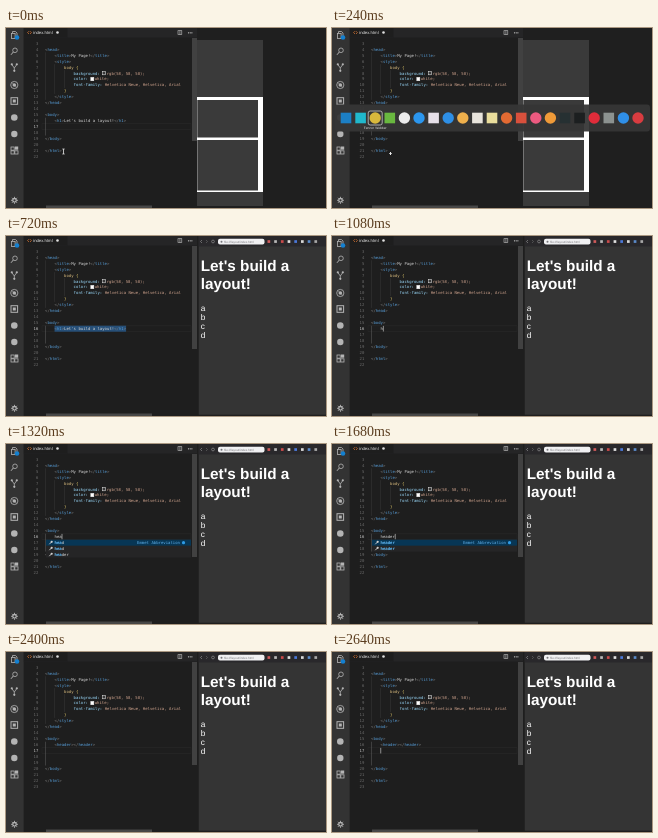
An HTML page with a canvas for the animation above (2.88 s loop, 320 by 180 pixels).

```html
<!DOCTYPE html>
<html lang="en">
<head>
<meta charset="utf-8">
<title>Building a layout</title>
<style>
html, body { margin: 0; width: 100%; height: 100%; overflow: hidden; background: #1e1e1e; }
canvas { display: block; width: 320px; height: 180px; }
</style>
</head>
<body>
<canvas id="stage"></canvas>
<script>
const LOOP = 2880, TICK = 120;
const COL = 2.385, LEFT = 39, ROW = 5.95;
const EDGE = 191, PAGE = '#343434';
const MONO = '"DejaVu Sans Mono", monospace';
const SANS = '"Liberation Sans", sans-serif';
const canvas = document.getElementById('stage');
const ctx = canvas.getContext('2d');
const dpr = window.devicePixelRatio || 1;
canvas.width = 320 * dpr;
canvas.height = 180 * dpr;

const rowY = n => 21.3 + (n - 4) * ROW;
const colX = c => LEFT + c * COL;

function rect(x, y, w, h, color) {
  ctx.fillStyle = color;
  ctx.fillRect(x, y, w, h);
}

function box(x, y, w, h, color, width = 0.5) {
  ctx.strokeStyle = color;
  ctx.lineWidth = width;
  ctx.strokeRect(x, y, w, h);
}

function pill(x, y, w, h, r, color) {
  ctx.fillStyle = color;
  ctx.beginPath();
  ctx.roundRect(x, y, w, h, r);
  ctx.fill();
}

function disc(x, y, r, color) {
  ctx.fillStyle = color;
  ctx.beginPath();
  ctx.arc(x, y, r, 0, 7);
  ctx.fill();
}

function ring(x, y, r, color, width = 0.8) {
  ctx.strokeStyle = color;
  ctx.lineWidth = width;
  ctx.beginPath();
  ctx.arc(x, y, r, 0, 7);
  ctx.stroke();
}

function path(points, color, width = 0.8) {
  ctx.strokeStyle = color;
  ctx.lineWidth = width;
  ctx.beginPath();
  points.forEach(([x, y]) => ctx.lineTo(x, y));
  ctx.stroke();
}

// Lay text out large and scale it down, so small sizes keep exact advances.
function text(str, x, y, size, color, family = SANS, align = 'left', weight = '') {
  ctx.save();
  ctx.translate(x, y);
  ctx.scale(1 / 8, 1 / 8);
  ctx.font = `${weight} ${size * 8}px ${family}`;
  ctx.textRendering = 'geometricPrecision';
  ctx.textAlign = align;
  ctx.fillStyle = color;
  ctx.fillText(str, 0, 0);
  ctx.restore();
}

function code(str, x, y, color, align) {
  text(str, x, y + 1.4, COL / 0.602, color, MONO, align);
}

function markup(str, indent, n) {
  let col = indent;
  for (const part of str.match(/<\/?|>|[^<>]+/g) || []) {
    const before = str.slice(0, col - indent);
    const color = /[<>]/.test(part) ? '#808080' : /<\/?$/.test(before) ? '#569cd6' : '#d4d4d4';
    code(part, colX(col), rowY(n), color);
    col += part.length;
  }
}

function rule(prop, value, n, swatch) {
  code(prop + ':', colX(12), rowY(n), '#9cdcfe');
  let x = colX(12 + prop.length + 2);
  if (swatch) {
    rect(x + 0.5, rowY(n) - 1.7, 3, 3.4, swatch);
    box(x + 0.5, rowY(n) - 1.7, 3, 3.4, '#eeeeee');
    x += 4.4;
  }
  code(value, x, rowY(n), '#d0a48e');
}

function activityBar() {
  rect(0, 0, 17.5, 180, '#333333');
  const grey = '#b4b4b4';
  path([[6.5, 5], [6.5, 3.5], [9.5, 3.5], [11, 5], [11, 9.5], [10, 9.5]], grey);
  box(5.5, 5.5, 3.6, 5, grey, 0.8);
  disc(11, 9.5, 2.3, '#1480d0');
  ring(9, 22.3, 2.3, grey);
  path([[7.3, 24], [5, 26.8]], grey, 1);
  path([[8.3, 43], [8.3, 40], [5.8, 36.5]], grey);
  path([[8.3, 40], [10.8, 36.5]], grey);
  [[5.8, 36.3], [10.8, 36.3], [8.3, 42.8]].forEach(([x, y]) => disc(x, y, 1.1, grey));
  ring(8.3, 57, 3.6, grey);
  disc(8.3, 57, 1.8, grey);
  path([[5.8, 54.5], [10.8, 59.5]], grey, 0.6);
  box(5, 69.7, 6.6, 6.6, grey, 1);
  rect(6.8, 71.5, 3, 3, grey);
  disc(8.3, 89.5, 3.3, grey);
  disc(8.3, 106, 3.2, grey);
  [[5, 119], [5, 122.8], [8.8, 122.8]].forEach(([x, y]) => box(x, y, 3.2, 3.2, grey, 0.8));
  rect(9, 118.5, 3.2, 3.2, grey);
  ring(8.5, 172.3, 1.8, grey, 1.3);
  for (let a = 0; a < 8; a++) {
    const dx = Math.cos(a * Math.PI / 4), dy = Math.sin(a * Math.PI / 4);
    path([[8.5 + dx * 2.2, 172.3 + dy * 2.2], [8.5 + dx * 3.5, 172.3 + dy * 3.5]], grey, 0.9);
  }
}

function tabBar() {
  rect(17.5, 0, EDGE - 17.5, 9.5, '#252526');
  rect(17.5, 0, 44, 9.5, '#1e1e1e');
  path([[23, 3.2], [21.6, 4.6], [23, 6]], '#e37933', 0.7);
  path([[24, 3.2], [25.4, 4.6], [24, 6]], '#e37933', 0.7);
  text('index.html', 27.2, 6, 4.25, '#e8e8e8');
  disc(51.5, 4.5, 1.3, '#e0e0e0');
  box(172, 2.7, 3.8, 3.8, '#c5c5c5', 0.6);
  path([[173.9, 2.7], [173.9, 6.5]], '#c5c5c5', 0.6);
  [182.5, 184.2, 185.9].forEach(x => disc(x, 4.8, 0.6, '#d5d5d5'));
}

const WORD = 'header', TAG = '<header></header>';

function editLine(s) {
  if (s < 7) return "<h1>Let's build a layout!</h1>";
  if (s < 15) return WORD.slice(0, Math.max(0, s - 8));
  return TAG;
}

function caretCol(s) {
  if (s >= 18) return 4;
  if (s === 15 || s === 16) return 12;
  return 4 + editLine(s).length;
}

const caretOn = s => s >= 7 && ![17, 20, 21].includes(s);

function editor(s) {
  rect(17.5, 0, EDGE - 17.5, 180, '#1e1e1e');
  const active = s < 6 || s >= 18 ? 17 : 16;
  const shift = s >= 18 ? 1 : 0;
  box(36, rowY(active) - 2.9, 149, 5.8, '#2a2a2a');
  const guide = (col, from, to, color = '#393939') =>
    rect(colX(col), rowY(from) - 3, 0.5, (to - from + 1) * ROW, color);
  guide(0, 5, 12);
  guide(4, 7, 11);
  guide(8, 8, 10);
  guide(0, 16, 18 + shift, '#606060');

  for (let n = 3; n <= 22 + shift; n++) {
    code(String(n), 32.3, rowY(n), n === active ? '#c6c6c6' : '#6c6c6c', 'right');
  }
  if (s === 6) rect(colX(4), rowY(16) - 3, 30 * COL, 6, '#264f78');
  if (s === 17) {
    [12, 20].forEach(c => box(colX(c), rowY(16) - 2.5, COL, 5, '#888888', 0.4));
  }

  markup('<head>', 0, 4);
  markup('<title>My Page!</title>', 4, 5);
  markup('<style>', 4, 6);
  code('body', colX(8), rowY(7), '#d7ba7d');
  code('{', colX(13), rowY(7), '#e0c86a');
  rule('background', 'rgb(58, 58, 58);', 8, '#3a3a3a');
  rule('color', 'white;', 9, '#ffffff');
  rule('font-family', 'Helvetica Neue, Helvetica, Arial', 10);
  code('}', colX(8), rowY(11), '#e0c86a');
  markup('</style>', 4, 12);
  markup('</head>', 0, 13);
  markup('<body>', 0, 15);
  markup(editLine(s), 4, 16);
  markup('</body>', 0, 19 + shift);
  markup('</html>', 0, 21 + shift);

  if (caretOn(s)) rect(colX(caretCol(s)), rowY(active) - 2.8, 0.6, 5.6, '#d8d8d8');
  if (s >= 10 && s <= 14) popup(s);
  rect(186, 10, 5, 103, '#414141');
  rect(40, 177.5, 106, 2.5, '#474747');
  tabBar();
}

function popup(s) {
  const typed = editLine(s);
  const items = s < 13 ? ['head', 'head', 'header'] : [typed, 'header'];
  const top = rowY(16) + 3;
  rect(40, top, 145, items.length * ROW, '#252526');
  rect(40, top, 145, ROW, '#073655');
  items.forEach((item, i) => {
    const y = rowY(17 + i);
    path([[43.3, y + 1.6], [45.4, y - 0.6]], '#d0d0d0', 0.9);
    disc(45.7, y - 0.8, 1.1, '#d0d0d0');
    code(item, colX(4), y, '#d4d4d4');
    code(typed, colX(4), y, '#1a9cf5');
  });
  code('Emmet Abbreviation', 174, rowY(17), '#5fb0ea', 'right');
  disc(177.5, rowY(17), 1.6, '#2e9be6');
}

function mockup() {
  rect(EDGE, 0, 129, 180, '#1f1f1f');
  rect(EDGE, 12, 66, 166, '#3a3a3a');
  rect(EDGE, 69, 66, 95, '#ffffff');
  rect(191.3, 72, 60.7, 37.5, '#3a3a3a');
  rect(191.3, 112, 60.7, 50.5, '#3a3a3a');
}

function browser() {
  rect(EDGE, 0, 129, 180, '#1e1e1e');
  rect(192.7, 0, 128, 178.7, PAGE);
  rect(192.7, 0, 128, 10.5, '#29282b');
  path([[196, 4], [194.5, 5.5], [196, 7]], '#9a9a9a', 0.6);
  path([[200, 4], [201.5, 5.5], [200, 7]], '#6c6c6c', 0.6);
  ring(207, 5.5, 1.4, '#9a9a9a', 0.6);
  pill(212, 2.8, 46.5, 5.8, 2, '#f0f0f2');
  text('file:///layout/index.html', 218, 6.7, 3, '#77777c');
  disc(215.5, 5.7, 1, '#77777c');
  const tints = ['#d05a5a', '#b8b8b8', '#c94b4b', '#e0e0e0', '#4b78d9', '#d8d8d8', '#5a8ac9', '#a8a8a8'];
  tints.forEach((c, i) => rect(261.5 + i * 6.7, 4.2, 2.7, 2.7, c));
  text("Let's build a", 194.7, 34.8, 15.3, '#ffffff', SANS, 'left', 'bold');
  text('layout!', 194.7, 53.3, 15.3, '#ffffff', SANS, 'left', 'bold');
  [...'abcd'].forEach((c, i) => text(c, 194.7, 75 + i * 9.1, 8.25, '#ffffff'));
}

// Each entry: colour, then "o" for a round icon.
const APPS = ['#1c7fc4', '#20b8cc', '#d8b83c o', '#69b83f', '#ececec o', '#2b96ee o',
  '#e6e0e8', '#2e8fe6 o', '#efb04c o', '#e8e4dc', '#e9dd9c', '#e36a32 o', '#d8503c',
  '#ec5a80 o', '#f09a38 o', '#263032', '#1c1f20', '#e02c3a o', '#8c9290', '#2f8fe8 o', '#d93c40 o'];

function switcher(picked, alpha) {
  ctx.save();
  ctx.globalAlpha = alpha;
  pill(3, 76.5, 315, 27, 3, 'rgba(54,54,54,0.94)');
  APPS.forEach((app, i) => {
    const [color, round] = app.split(' ');
    const x = 14 + i * 14.6, y = 90;
    if (i === picked) {
      ctx.strokeStyle = '#c8c8c8';
      ctx.lineWidth = 0.8;
      ctx.beginPath();
      ctx.roundRect(x - 7, y - 7, 14, 14, 2);
      ctx.stroke();
    }
    if (round) disc(x, y, 5.7, color);
    else rect(x - 5.3, y - 5.3, 10.6, 10.6, color);
  });
  const label = picked === 2 ? 'Fennor Webber' : 'Brushfield';
  text(label, 14 + picked * 14.6, 101.2, 3.3, '#e0e0e0', SANS, 'center');
  ctx.restore();
}

function pointer(s) {
  if (s === 0) {
    path([[57.5, 121], [57.5, 126]], '#e8e8e8');
    path([[56.3, 121], [58.7, 121]], '#e8e8e8', 0.7);
    path([[56.3, 126], [58.7, 126]], '#e8e8e8', 0.7);
  } else if (s < 5) {
    path([[58.5, 124], [58.5, 127]], '#e8e8e8', 1);
    path([[57.2, 125.5], [59.8, 125.5]], '#e8e8e8', 0.9);
  }
}

const FADE = [0, 1, 1, 0.42, 0.14];

function draw(now) {
  const s = Math.floor((now % LOOP) / TICK);
  ctx.setTransform(dpr, 0, 0, dpr, 0, 0);
  editor(s);
  activityBar();
  if (s < 3) mockup(); else browser();
  if (FADE[s]) switcher(Math.min(s, 2), FADE[s]);
  pointer(s);
}

const start = performance.now();
function loop() {
  draw(performance.now() - start);
  requestAnimationFrame(loop);
}
loop();
</script>
</body>
</html>
```
